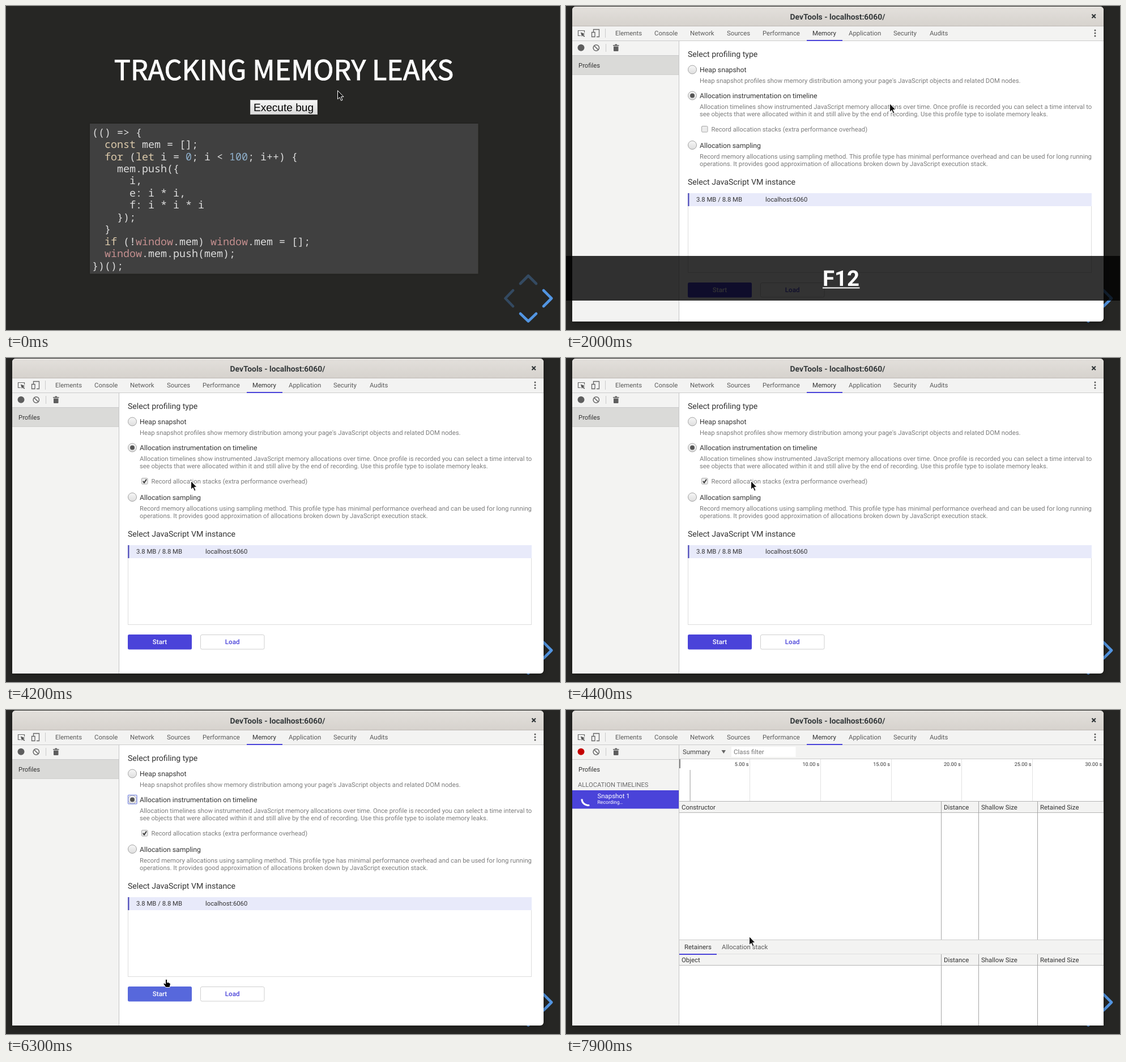
An HTML page for the animation above (8000 ms loop, 978 by 573 pixels).

```html
<!DOCTYPE html>
<html lang="en">
<head>
<meta charset="utf-8">
<title>Tracking memory leaks</title>
<style>
html, body { margin: 0; width: 100%; height: 100%; overflow: hidden; background: #262624; }
svg { display: block; width: 978px; height: 573px; }
text { white-space: pre; text-rendering: geometricPrecision; font-family: Roboto, sans-serif; }
.title { font-family: "Noto Sans CJK JP", "Noto Sans CJK SC", "Noto Sans CJK", "Open Sans", sans-serif; font-weight: 500; }
.code { font-family: "Noto Sans Mono", "DejaVu Sans Mono", monospace; }
.btn { font-family: "Liberation Sans", Arial, sans-serif; }
</style>
</head>
<body>
<svg id="stage" viewBox="0 0 978 573" xmlns="http://www.w3.org/2000/svg"></svg>
<script>
const LOOP = 8000, STEP = 100;
const BLUE = '#4a43d9', PANEL = '#f3f3f2', LINE = '#cbcbcb', INK = '#333', DIM = '#7c7c7c';

const text = (x, y, s, size = 11.3, fill = INK, attrs = '') =>
  `<text x="${x}" y="${y}" font-size="${size}" fill="${fill}" ${attrs}>${s}</text>`;
const rect = (x, y, w, h, fill, attrs = '') =>
  `<rect x="${x}" y="${y}" width="${w}" height="${h}" fill="${fill}" ${attrs}/>`;
const path = (d, stroke, width = 1, attrs = '') =>
  `<path d="${d}" fill="none" stroke="${stroke}" stroke-width="${width}" ${attrs}/>`;
const group = (id, body, attrs = '') => `<g id="${id}" ${attrs}>${body}</g>`;
const mid = 'text-anchor="middle"';

// Slide
const code = `(() => {
  const mem = [];
  for (let i = 0; i < 100; i++) {
    mem.push({
      i,
      e: i * i,
      f: i * i * i
    });
  }
  if (!window.mem) window.mem = [];
  window.mem.push(mem);
})();`;

function paint(line) {
  const tone = w => w === 'window' ? '#c48f8f' : /\d/.test(w) ? '#8fb0cc' : '#dccaab';
  return line.replace(/</g, '&lt;').replace(/\b(const|for|let|if|window|\d+)\b/g,
    w => `<tspan fill="${tone(w)}">${w}</tspan>`);
}

function slide() {
  const lines = code.split('\n').map((l, i) =>
    text(152, 229.6 + i * 21.45, paint(l), 18.33, '#dcdcdc', 'class="code"')).join('');
  const chevron = (d, id, dim) =>
    path(d, '#5295e2', 4.6, `id="${id}" stroke-linecap="round" stroke-linejoin="round" opacity="${dim ? .32 : 1}"`);
  return rect(0, 0, 978, 573, '#262624') +
    text(490.5, 131, 'TRACKING MEMORY LEAKS', 48.5, '#fff', `class="title" stroke="#fff" stroke-width=".9" ${mid}`) +
    rect(431.5, 166.5, 118, 25, 'url(#face)', 'id="bug" stroke="#c4c4c4"') +
    text(490, 185.6, 'Execute bug', 19.1, '#000', `class="btn" ${mid}`) +
    rect(148, 208, 685.5, 265.5, '#40403f', 'filter="url(#soft)"') + lines +
    chevron('M908 491L922 477L936 491', 'up', true) +
    chevron('M895 503L881.500 517L895 531', 'left', true) +
    chevron('M949 503L963 517L949 531', 'right') +
    chevron('M908 544L922 557.500L936 544', 'down');
}

// Window frame shared by both views
function frame() {
  const tabs = [['Elements', 87], ['Console', 156], ['Network', 219], ['Sources', 284], ['Performance', 347],
    ['Memory', 435], ['Application', 499], ['Security', 578], ['Audits', 642]];
  const dots = [43, 48, 53].map(y => `<circle cx="934" cy="${y}" r="1.5" fill="#555"/>`).join('');
  return rect(11, 1, 938, 557, '#fff', 'rx="6" filter="url(#shade)"') +
    `<path d="M11 36V8Q11 1 18 1H942Q949 1 949 8V36Z" fill="url(#bar)"/>` +
    path('M17 1.500H943', '#f0eeeb') +
    text(479.5, 23.5, 'DevTools - localhost:6060/', 13.9, '#33383a', `font-weight="700" ${mid}`) +
    path('M928.500 14.800l6.400 6.400m0-6.400l-6.400 6.400', '#2e3436', 2.1) +
    rect(11, 35, 938, 27, PANEL) + path('M11 35.500H949', '#bdb9b4') + path('M11 61.500H949', LINE) +
    tabs.map(([s, x]) => text(x, 52, s, 11.4, s === 'Memory' ? INK : '#5a5a5a')).join('') +
    rect(425, 60, 63, 2, BLUE) + dots +
    path('M26 52.500H21.500V43.500H32.500V47', '#666', 1.2) +
    '<path d="M26 46.500l7.500 3-3 1.200 2.800 2.900-1.300 1.200-2.800-2.900-1.200 2.700z" fill="#555"/>' +
    path('M48.500 46V41.500H58.500V54.500H54', '#666', 1.3) + path('M45.500 46.500h5.500v8h-5.500z', '#666', 1.3) +
    path('M69.500 40V56', LINE) +
    rect(11, 62, 188, 496, PANEL) + path('M11 87.500H199', LINE) + path('M199.500 62V558', '#c4c4c4') +
    '<circle id="dot" cx="26.500" cy="73.700" r="6" fill="#5e5e5e"/>' +
    '<circle cx="53.300" cy="74" r="5.200" fill="none" stroke="#666" stroke-width="1.500"/>' +
    path('M49.700 70.300l7.300 7.300', '#666', 1.5) + path('M70.500 67V81', LINE) +
    '<path d="M83 69h3l1-1.500h2.500l1 1.500h3v1.500H83zM84 71.500h8.500v7.500q0 1-1 1H85q-1 0-1-1z" fill="#5e5e5e"/>';
}

// Profile type picker
function setup() {
  const radio = (y, on) => `<circle cx="223" cy="${y}" r="7.500" fill="url(#knob)" stroke="#a3a3a3"/>` +
    (on ? `<circle cx="223" cy="${y}" r="4" fill="#555"/>` : '');
  const note = (y, s) => text(236, y, s, 11.3, DIM);
  const head = (y, s) => text(215, y, s, 14.1, INK);
  const label = (y, s) => text(236, y, s, 12.25, INK);
  return rect(11, 88, 188, 33.5, '#dadad8') + path('M11 121.500H199', '#d0d0ce') + text(22, 108.5, 'Profiles') +
    head(90, 'Select profiling type') +
    radio(112.5) + label(117, 'Heap snapshot') +
    note(136, "Heap snapshot profiles show memory distribution among your page's JavaScript objects and related DOM nodes.") +
    radio(158.5, true) + rect(215.5, 150.5, 15.5, 15.5, 'none', 'id="ring" stroke="#8f9be6" stroke-width="1.600" rx="1"') +
    label(163, 'Allocation instrumentation on timeline') +
    note(182, 'Allocation timelines show instrumented JavaScript memory allocations over time. Once profile is recorded you can select a time interval to') +
    note(195.3, 'see objects that were allocated within it and still alive by the end of recording. Use this profile type to isolate memory leaks.') +
    rect(239.5, 212.5, 10.5, 10.5, '#ececec', 'stroke="#a8a8a8" rx="1.500"') +
    path('M241.800 217.800l2.200 2.700 4-6', '#3c3c3c', 2, 'id="tick"') +
    text(256.5, 221.6, 'Record allocation stacks (extra performance overhead)', 11.3, DIM) +
    radio(246) + label(251, 'Allocation sampling') +
    note(270, 'Record memory allocations using sampling method. This profile type has minimal performance overhead and can be used for long running') +
    note(283.3, 'operations. It provides good approximation of allocations broken down by JavaScript execution stack.') +
    head(316, 'Select JavaScript VM instance') +
    rect(215.5, 331.5, 712, 140, '#fff', 'stroke="#dcdcdc"') + rect(215, 331, 713, 23, '#e8eafa') +
    rect(215, 331, 2.5, 23, '#5c59bf') +
    text(230, 346.4, '3.8 MB / 8.8 MB') + text(352, 346.4, 'localhost:6060') +
    rect(215, 489, 113, 26.5, BLUE, 'id="go" rx="2.500"') +
    text(271.5, 506, 'Start', 11.6, '#fff', `font-weight="500" ${mid}`) +
    rect(343.5, 489.5, 112.5, 25.5, '#fff', 'rx="2.500" stroke="#cfcfcf"') +
    text(399.7, 506, 'Load', 11.6, BLUE, `font-weight="500" ${mid}`);
}

// Recording view
function record() {
  const header = (y, first) => rect(200, y, 749, 20, PANEL) + path(`M200 ${y + 19.5}H949`, '#b4b4b4') +
    [[first, 204], ['Distance', 667], ['Shallow Size', 733], ['Retained Size', 837]]
      .map(([s, x]) => text(x, y + 14, s, 11.4)).join('');
  const columns = (a, b) => [662.5, 728.5, 832.5].map(x => path(`M${x} ${a}V${b}`, '#a6a6a6')).join('');
  let ruler = '';
  for (let i = 1; i <= 6; i++) {
    const x = 199.8 + i * 124.75;
    ruler += path(`M${Math.floor(x) + .5} 87V161`, '#e2e2e2') +
      text(x - 2, 99.3, (i * 5).toFixed(2) + ' s', 9.1, INK, 'text-anchor="end"');
  }
  return text(22, 108.5, 'Profiles') + text(21, 136, 'ALLOCATION TIMELINES', 11.2, '#6a6a6a') +
    rect(11, 142, 188, 32.5, BLUE) + text(55.5, 156, 'Snapshot 1', 11.4, '#fff') +
    text(55.5, 166.3, 'Recording…', 8.7, '#fff') +
    path('M28 157.500A11 11 0 0 0 41.300 168.300', '#fff', 3.2, 'id="spin"') +
    rect(200, 62, 749, 25, PANEL) + path('M200 86.500H949', LINE) +
    text(206, 77.7, 'Summary', 11.4, '#444') + '<path d="M274.500 71h7.500l-3.700 6z" fill="#666"/>' +
    rect(292, 65, 113.5, 18, '#fff') + text(296, 78.2, 'Class filter', 11.4, '#777') +
    rect(200, 87, 749, 471, '#fff') + ruler + rect(200, 87, 2, 16, '#858585') +
    rect(218.3, 106, 1.8, 55, '#c6c6c6', 'id="sample"') +
    path('M200 161.500H949', '#b4b4b4') + header(162, 'Constructor') + columns(162, 406) +
    rect(200, 406, 749, 26, PANEL) + path('M200 406.500H949', LINE) + path('M200 432H949', LINE) +
    text(209, 423, 'Retainers', 11.4) + text(275, 423, 'Allocation stack', 11.4, '#5a5a5a') +
    header(432, 'Object') + columns(432, 558) + rect(200, 431, 66, 2, BLUE);
}

function keys() {
  return rect(0, 442, 978, 79, '#000', 'opacity=".8"') +
    text(485.5, 495, 'F12', 38.3, '#fff', `font-weight="700" ${mid}`) +
    rect(453, 497.5, 65.5, 2, '#fff', 'id="under"');
}

function pointer() {
  const edge = 'stroke="#fff" stroke-width="1" stroke-linejoin="round"';
  return `<path id="arrow" d="M.500 .500V15.700L4 12.500 6.600 18.300 9 17.200 6.500 11.500H11Z" fill="#111" ${edge}/>` +
    `<path id="hand" d="M-1.500 1Q0-.800 1.500 1V6Q4 5 5 6.500Q7.500 6.500 7.300 9L6 14.500H-1L-5 8.500Q-5 6.500-3 7.200L-1.500 8.500Z" fill="#000" ${edge}/>`;
}

const defs = `<defs>
  <linearGradient id="face" x2="0" y2="1"><stop stop-color="#f6f6f6"/><stop offset="1" stop-color="#d9d9d9"/></linearGradient>
  <linearGradient id="bar" x2="0" y2="1"><stop stop-color="#e3e0dc"/><stop offset="1" stop-color="#d6d2cd"/></linearGradient>
  <linearGradient id="knob" x2="0" y2="1"><stop stop-color="#f7f7f7"/><stop offset="1" stop-color="#dedede"/></linearGradient>
  <filter id="soft"><feDropShadow dx="0" dy="0" stdDeviation="2" flood-opacity=".25"/></filter>
  <filter id="shade"><feDropShadow dx="0" dy="2" stdDeviation="6" flood-opacity=".35"/></filter>
</defs>`;

document.getElementById('stage').innerHTML = defs + slide() +
  group('win', frame() + group('setup', setup()) + group('rec', record())) +
  group('keys', keys()) + group('pointer', pointer());

const el = {};
for (const n of document.querySelectorAll('#stage [id]')) el[n.id] = n;

// Rows are [time, ...values]; values run linearly between rows
function along(rows, t) {
  const i = rows.findIndex(r => r[0] > t);
  if (i === 0) return rows[0].slice(1);
  if (i < 0) return rows[rows.length - 1].slice(1);
  const a = rows[i - 1], b = rows[i], k = (t - a[0]) / (b[0] - a[0]);
  return a.slice(1).map((v, j) => v + (b[j + 1] - v) * k);
}

const route = [
  [100, 585, 149], [200, 541, 173], [900, 541, 173], [1100, 573, 172], [1400, 573, 172], [1500, 571, 172],
  [2400, 571, 172], [2600, 470, 260], [2900, 240, 465], [3000, 233, 470], [3100, 255, 432], [3200, 255, 432],
  [3300, 279, 395], [3400, 279, 395], [3600, 308, 285], [3800, 327, 211], [4000, 327, 211], [4100, 326, 217],
  [4400, 326, 217], [4700, 270, 178], [4900, 238, 166], [5200, 221, 156], [5400, 221, 156], [5500, 288, 330],
  [5600, 288, 330], [5800, 292, 505], [5900, 285, 554], [6000, 285, 554], [6300, 283, 476], [6500, 287, 495],
  [6900, 290, 498], [7300, 320, 408], [7400, 323, 400]
];
const hop = [[200, 0], [400, 10], [500, 0], [600, -5], [800, 0]];

const show = (node, on) => node.setAttribute('display', on ? 'inline' : 'none');
const within = (t, a, b) => t >= a && t < b;

function draw(time) {
  const t = Math.floor(time / STEP) * STEP;
  const recording = t >= 7000;
  const hover = within(t, 5800, 5900) || within(t, 6200, 7000);

  el.down.setAttribute('transform', `translate(0 ${along(hop, (t + 1750) % 2000)[0]})`);
  el.bug.style.filter = within(t, 500, 600) ? 'brightness(.86)' : within(t, 200, 1000) ? 'brightness(1.04)' : 'none';

  show(el.win, t >= 2000);
  show(el.setup, !recording);
  show(el.rec, recording);
  el.dot.setAttribute('fill', recording ? '#c40000' : '#5e5e5e');
  show(el.tick, t >= 4100);
  show(el.ring, within(t, 5400, 6700));
  el.go.setAttribute('fill', hover ? '#5768dc' : BLUE);
  show(el.keys, within(t, 2000, 4200));
  show(el.under, t < 2100);
  el.spin.setAttribute('transform', `rotate(${(t - 7900) * .36} 39 157.500)`);
  show(el.sample, t >= 7900);

  const [x, y] = along(route, t);
  el.pointer.setAttribute('transform', `translate(${x.toFixed(1)} ${y.toFixed(1)})`);
  show(el.arrow, !hover);
  show(el.hand, hover);
}

const start = performance.now();
function tick() {
  draw((performance.now() - start) % LOOP);
  requestAnimationFrame(tick);
}
tick();
</script>
</body>
</html>
```
